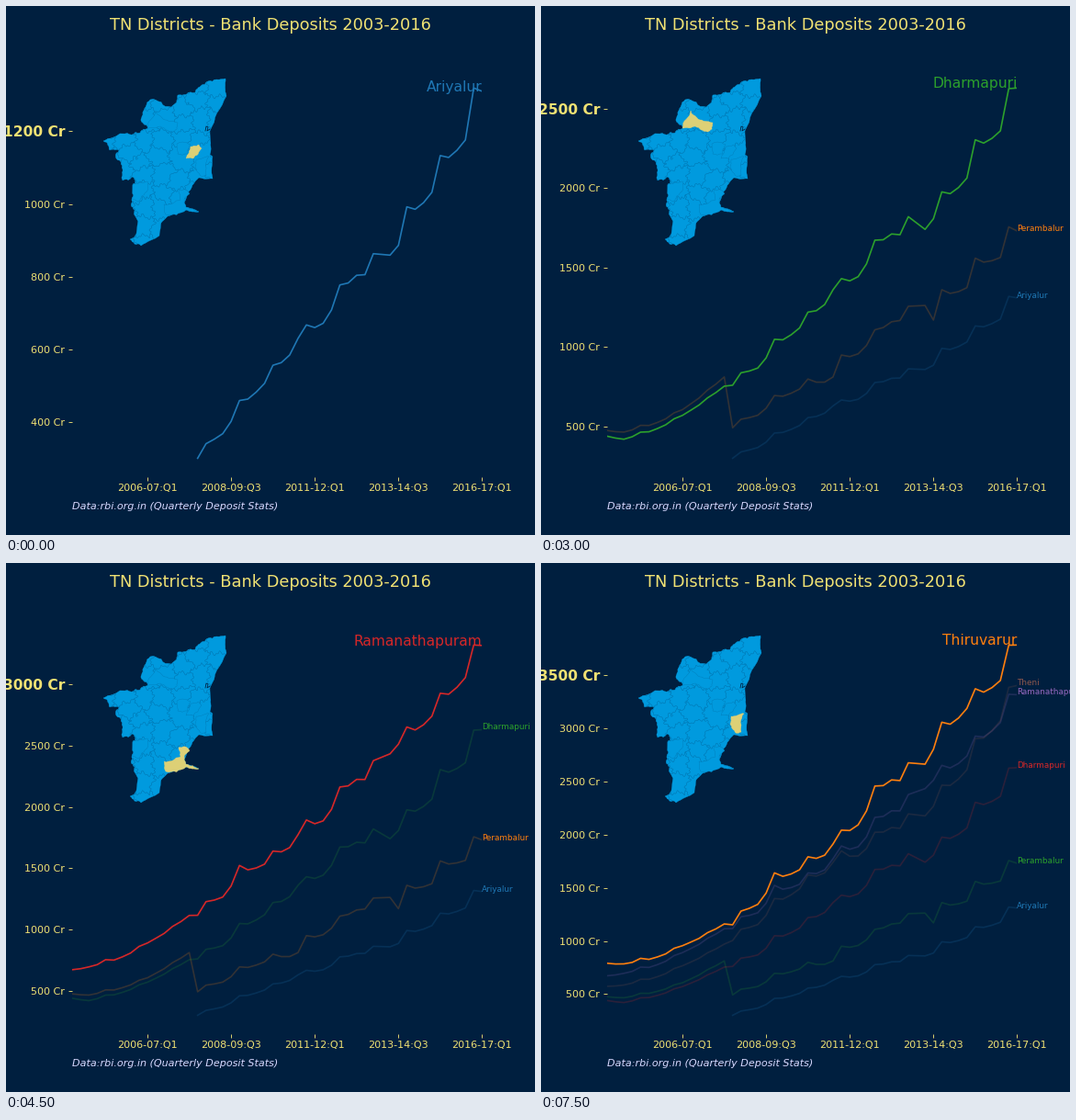
Animation of 576x576 px, one loop 8000 ms. Source, as a matplotlib script:

```python
import numpy as np
import matplotlib.pyplot as plt
from matplotlib.animation import FuncAnimation
from matplotlib.patches import Polygon

SIZE, DPI = 576, 80
HOLD = 3  # ticks of 500 ms per stage
FRAMES = 16
NAVY, SAND, MIST = "#001f3f", "#f0e173", "#d9d9ff"
SEA, EDGE, PICK = "#009ade", "#0078b4", "#ddd076"
CYCLE = ["C0", "C1", "C2", "C3", "C4", "C5"]
LAST = 49

plt.rcParams["font.family"] = "DejaVu Sans"

# Deposits (crore) at chosen quarters; the quarters between them follow a
# straight line, bent by a yearly swing (percent) common to all districts.
KNOTS = [0, 2, 9, 14, 15, 20, 24, 27, 28, 32, 36, 38, 39, 40, 43, 44, 47, 48,
         LAST]
SWING = [-0.5, -1.3, 0.4, -3.6, -3.7, -3.1, 0, -0.7, -1.2, 0, -0.5, 2.5, -3,
         -7, -6, -4.2, -5, -4.8, -3, -3.5, -5, -7, -5.5, -2, -2, -4.3, 0, -2,
         -1.5, -1.7, -1.2]
DEPOSITS = {
    "Ariyalur": [300, 459, 556, 630, 667, 777, 863, 859, 886, 992, 1032, 1133,
                 1176, 1319, 1310],
    "Perambalur": [475, 465, 606, 812, 492, 695, 799, 812, 950, 1109, 1257,
                   1262, 1170, 1361, 1374, 1560, 1564, 1757, 1731],
    "Dharmapuri": [439, 420, 570, 754, 760, 1049, 1220, 1361, 1431, 1673,
                   1821, 1741, 1808, 1977, 2064, 2305, 2361, 2627, 2631],
    "Ramanathapuram": [672, 695, 890, 1115, 1116, 1523, 1640, 1774, 1894,
                       2163, 2378, 2434, 2513, 2653, 2741, 2928, 3056, 3322,
                       3318],
    "Theni": [573, 585, 766, 970, 1004, 1399, 1621, 1740, 1848, 2023, 2196,
              2177, 2268, 2466, 2611, 2904, 3073, 3387, 3405],
    "Thiruvarur": [790, 784, 955, 1160, 1152, 1641, 1792, 1913, 2043, 2458,
                   2677, 2664, 2804, 3059, 3189, 3374, 3452, 3784, 3786],
}

# State outline in stage pixels: the sea side, then the land side.
COAST = [(229, 80), (239, 79), (240, 98), (222, 136), (222, 162), (225, 164),
         (225, 188), (210, 187), (203, 195), (194, 214), (196, 219),
         (210, 224), (196, 222), (176, 229), (169, 236), (167, 250),
         (147, 261)]
BORDER = [(147, 261), (135, 254), (140, 222), (137, 210), (141, 194),
          (138, 186), (127, 190), (127, 180), (120, 166), (123, 157),
          (113, 157), (106, 147), (127, 139), (146, 138), (155, 132),
          (147, 123), (152, 110), (157, 102), (180, 110), (187, 97),
          (206, 94), (212, 87), (229, 80)]
SHAPES = [
    [(201, 153), (210, 151), (213, 155), (204, 166), (196, 166)],
    [(186, 150), (192, 148), (201, 151), (198, 161), (187, 161)],
    [(163, 114), (171, 123), (187, 127), (186, 134), (181, 137), (168, 131),
     (154, 133)],
    [(188, 201), (195, 200), (200, 204), (194, 214), (196, 219), (210, 224),
     (196, 222), (174, 227), (172, 216), (190, 211)],
    [(139, 193), (154, 191), (152, 203), (144, 213), (137, 210)],
    [(207, 167), (221, 164), (218, 184), (212, 185), (206, 175)],
]


def series(values):
    quarters = np.arange(LAST + 1)
    swing = np.zeros(LAST + 1)
    swing[np.setdiff1d(quarters, KNOTS)] = SWING
    knots = KNOTS[-len(values):]
    line = np.interp(quarters, knots, values) * (1 + swing / 100)
    return quarters[knots[0]:], line[knots[0]:]


SERIES = [(name, *series(values)) for name, values in DEPOSITS.items()]


def rough(points, amount, rng):
    """Break each segment at its middle and push it sideways, repeatedly."""
    pts = np.array(points, float)
    for _ in range(3):
        step = np.diff(pts, axis=0)
        side = np.stack([-step[:, 1], step[:, 0]], axis=1)
        push = rng.uniform(-amount, amount, (len(step), 1))
        out = np.empty((2 * len(pts) - 1, 2))
        out[::2], out[1::2] = pts, pts[:-1] + step / 2 + side * push
        pts = out
    return pts


def draw_map(ax):
    rng = np.random.default_rng(7)
    outline = np.vstack([rough(COAST, 0.06, rng), rough(BORDER, 0.2, rng)])
    state = ax.add_patch(Polygon(outline, fc=SEA, ec=SEA, lw=0.3))

    # District lines: nearest of some scattered centres on a wavy grid.
    gx, gy = np.meshgrid(np.arange(110, 250, 20), np.arange(85, 270, 20))
    centres = np.stack([gx.ravel(), gy.ravel()], axis=1)
    centres = centres + rng.uniform(-7, 7, centres.shape)
    x, y = np.meshgrid(np.arange(104, 244, 0.5), np.arange(77, 264, 0.5))
    u = x + 1.6 * np.sin(y * 0.55) + np.sin(y * 1.5 + x * 0.4)
    v = y + 1.6 * np.sin(x * 0.6) + np.sin(x * 1.4 - y * 0.3)
    dist = np.array([np.hypot(u - cx, v - cy) for cx, cy in centres])
    for i, d in enumerate(dist):
        gap = d - np.delete(dist, i, axis=0).min(axis=0)
        if gap.min() < 0:
            lines = ax.contour(x, y, gap, [0], colors=EDGE, linewidths=0.3)
            lines.set_clip_path(state)

    ax.plot([217, 218, 220, 219, 222], [136, 131, 132, 136, 134],
            color=NAVY, lw=0.7)
    return [ax.add_patch(Polygon(rough(shape + shape[:1], 0.16, rng), fc=SEA,
                                 ec=EDGE, lw=0.3, zorder=4))
            for shape in SHAPES]


fig = plt.figure(figsize=(SIZE / DPI, SIZE / DPI), dpi=DPI, facecolor=NAVY)
ax = fig.add_axes([0.125, 0.11, 0.775, 0.77])
map_ax = fig.add_axes([0, 0, 1, 1], zorder=-1)
map_ax.set(xlim=(0, SIZE), ylim=(SIZE, 0))
map_ax.axis("off")
districts = draw_map(map_ax)
fig.suptitle("TN Districts - Bank Deposits 2003-2016", fontsize=16, color=SAND)
fig.text(0.125, 1 - 548 / SIZE, "Data:rbi.org.in (Quarterly Deposit Stats)",
         fontsize=10, style="italic", color=MIST)


def line_colors(stage):
    # The last district joins in second place of the colour cycle.
    if stage == len(SERIES) - 1:
        return CYCLE[:1] + CYCLE[2:] + CYCLE[1:2]
    return CYCLE[:stage + 1]


def draw_chart(stage):
    ax.clear()
    ax.set_facecolor("none")
    ax.spines[:].set_visible(False)
    shown = SERIES[:stage + 1]
    for i, ((name, quarters, values), color) in enumerate(
            zip(shown, line_colors(stage))):
        lead = i == stage
        ax.plot(quarters, values, color=color, lw=1.5, zorder=3 if lead else 2,
                alpha=1 if lead else 0.2)
        ax.text(LAST, values[-1], name, color=color,
                ha="right" if lead else "left", fontsize=14 if lead else 8)

    low, high = SERIES[0][2].min(), shown[-1][2].max()
    pad = 0.05 * (high - low)
    low, high = low - pad, high + pad
    step = 200 if high < 2000 else 500
    ticks = np.arange(np.ceil(low / step) * step, high, step)
    ax.set(xlim=(0, LAST), ylim=(low, high))
    ax.set_yticks(ticks, [f"{t:.0f} Cr" for t in ticks])
    ax.set_xticks(range(9, 50, 10), ["2006-07:Q1", "2008-09:Q3", "2011-12:Q1",
                                     "2013-14:Q3", "2016-17:Q1"])
    ax.tick_params(colors=SAND, labelsize=10)
    ax.get_yticklabels()[-1].set(fontsize=14, fontweight="bold")


def update(frame):
    stage = min(frame // HOLD, len(SERIES) - 1)
    draw_chart(stage)
    for i, patch in enumerate(districts):
        patch.set_facecolor(PICK if i == stage else SEA)
        patch.set_edgecolor(PICK if i == stage else EDGE)
    return []


anim = FuncAnimation(fig, update, frames=FRAMES, interval=500, repeat=True,
                     init_func=lambda: [], blit=False)
plt.show()
```
